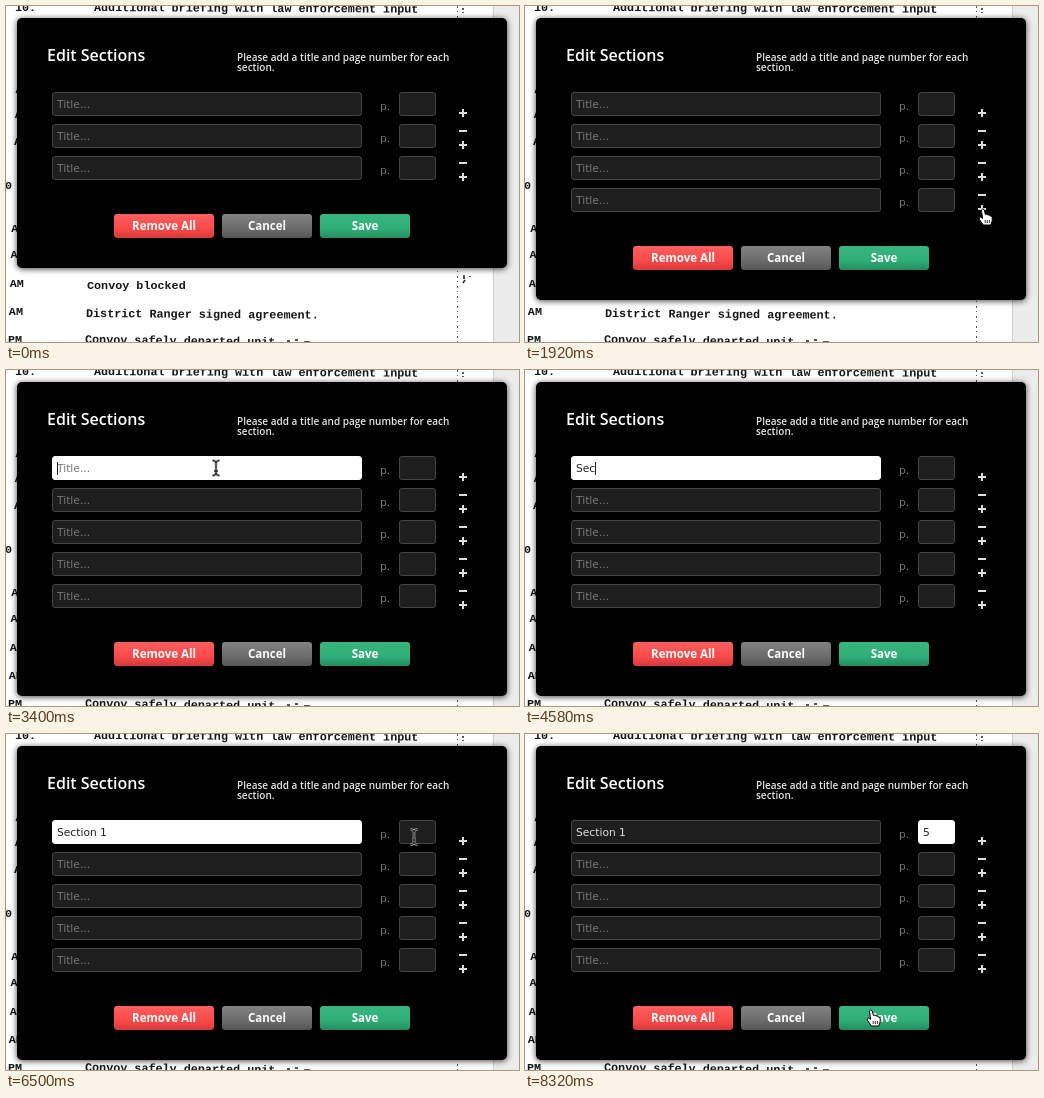
Write an HTML page that moves like this. It is 513x336 px and loops after 8340 ms.

```html
<!DOCTYPE html>
<html lang="en">
<head>
<meta charset="utf-8">
<title>Edit Sections</title>
<style>
  html, body { margin: 0; width: 100%; height: 100%; overflow: hidden; background: #fff; }
  svg { display: block; width: 513px; height: 336px; }
  text { white-space: pre; }
  .typed { font: bold 11.75px "Liberation Mono", monospace; fill: #161616; }
  .ui { font-family: "Open Sans", "Noto Sans", sans-serif; font-weight: 600; fill: #fff; }
  .head { font-size: 16px; }
  .hint { font-size: 10px; fill: #e6e6e6; }
  .btn text { font-size: 11.5px; font-weight: 700; text-anchor: middle; }
  .field text, .page { font: 10.7px "DejaVu Sans", sans-serif; fill: #777; }
  .field rect { fill: #1e1e1e; stroke: #444; }
  .field .filled { fill: #ddd; }
  .focus rect { fill: #fff; stroke: #fff; }
  .focus .filled { fill: #222; }
  .sign { stroke: #ddd; stroke-width: 2; }
  .panel { filter: drop-shadow(0 1px 3px rgba(0, 0, 0, .75)); }
  .outline { stroke-linejoin: round; }
</style>
</head>
<body>
<svg viewBox="0 0 513 336">
  <defs>
    <linearGradient id="red" x2="0" y2="1"><stop stop-color="#ff5f5f"/><stop offset=".6" stop-color="#fb4a4a"/><stop offset="1" stop-color="#d63a3a"/></linearGradient>
    <linearGradient id="grey" x2="0" y2="1"><stop stop-color="#828282"/><stop offset=".6" stop-color="#6c6c6c"/><stop offset="1" stop-color="#555"/></linearGradient>
    <linearGradient id="green" x2="0" y2="1"><stop stop-color="#38b67f"/><stop offset=".6" stop-color="#2fae78"/><stop offset="1" stop-color="#248c60"/></linearGradient>
  </defs>

  <g id="paper" class="typed">
    <rect x="487" width="26" height="336" fill="#ececec"/>
    <path d="M487.5 0V336" stroke="#ccc"/>
    <path d="M451.5 0V336" stroke="#555" stroke-dasharray="2 3 1 4"/>
    <path d="M457 2v2M457 6v1M458 269v4M459 274l-2 3M464 270v1M281 335h3M289 334h3M298 336h6" stroke="#222" stroke-width="1.5"/>
    <text x="9" y="5">10.</text>
    <text x="88" y="5" transform="rotate(.3 88 5)">Additional briefing with law enforcement input</text>
    <text x="-1" y="183">0</text>
    <text x="81" y="283">Convoy blocked</text>
    <text x="80" y="311" transform="rotate(.4 80 311)">District Ranger signed agreement.</text>
    <text x="79" y="337" transform="rotate(.8 79 337)">Convoy safely departed unit</text>
  </g>

  <rect id="panel" class="panel" x="11" y="12" width="490" rx="5"/>
  <text class="ui head" x="41" y="55">Edit Sections</text>
  <text class="ui hint" x="231" y="54.5">Please add a title and page number for each<tspan x="231" dy="10">section.</tspan></text>

  <g id="rows"></g>
  <g id="buttons" class="ui btn"></g>
  <path id="caret" stroke="#222"/>

  <g id="cursor">
    <path id="arrow" class="outline" d="M0 0V15L3.6 11.8L6 17L8.4 16L6.1 10.9H11Z" fill="#000" stroke="#fff"/>
    <g id="beam" fill="none">
      <path d="M-3.5-7.5Q0-7.5 0-5Q0-7.5 3.5-7.5M0-5V5M-3.5 7.5Q0 7.5 0 5Q0 7.5 3.5 7.5M-2 3H2" stroke="#aaa" stroke-width="2.6"/>
      <path d="M-3.5-7.5Q0-7.5 0-5Q0-7.5 3.5-7.5M0-5V5M-3.5 7.5Q0 7.5 0 5Q0 7.5 3.5 7.5M-2 3H2" stroke="#111"/>
    </g>
    <g id="hand" class="outline">
      <path d="M-1.5 1Q0-1 1.5 1L2.5 5.5Q4 4.5 5 6Q6.6 5.2 7.3 7Q9 6.4 9.3 8.5V12L8 16H0L-4-.0Z" fill="none"/>
      <path d="M-1.6 1Q-.3-1 1.2 .8L2.4 5.4Q4 4.6 5 6Q6.6 5.3 7.2 7Q9 6.6 9.2 8.6V11.6L7.8 16H.4L-3.6 10.4Q-4.4 8.2-2.4 8L-.4 9.4Z" fill="#fff" stroke="#000"/>
      <path d="M2.2 11V14M4.3 11V14M6.4 11V14" stroke="#000" stroke-width=".8"/>
    </g>
  </g>
</svg>

<script>
const LOOP = 8340, ROW = 32, TOP = 86;
const $ = id => document.getElementById(id);

function add(parent, tag, attrs, text = '') {
  const el = document.createElementNS('http://www.w3.org/2000/svg', tag);
  for (const k in attrs) el.setAttribute(k, attrs[k]);
  el.textContent = text;
  parent.append(el);
  return el;
}

function addField(parent, x, y, w, text) {
  const g = add(parent, 'g', { class: 'field' });
  add(g, 'rect', { x: x + .5, y: y + .5, width: w - 1, height: 23, rx: 2.5 });
  return { g, x, y, label: add(g, 'text', { x: x + 5, y: y + 16 }, text) };
}

function addRow(i) {
  const y = TOP + i * ROW, g = add($('rows'), 'g', {});
  const title = addField(g, 46, y, 310, 'Title...');
  add(g, 'text', { class: 'page', x: 374, y: y + 18 }, 'p.');
  const page = addField(g, 393, y, 37, '');
  add(g, 'path', { class: 'sign', d: `M453 ${y + 21}h8m-4-4v8` + (i ? `M453 ${y + 7}h8` : '') });
  return { g, title, page };
}

function addButton(x, w, fill, text) {
  add($('buttons'), 'rect', { x, y: 0, width: w, height: 24, rx: 3, fill: `url(#${fill})` });
  add($('buttons'), 'text', { x: x + w / 2, y: 16 }, text);
}

for (const y of [87, 112, 139, 226, 252, 281, 309, 337])
  add($('paper'), 'text', { x: 2 + (337 - y) * .03, y }, y > 330 ? 'PM' : 'AM');

const rows = [0, 1, 2, 3, 4].map(addRow);
addButton(108, 100, 'red', 'Remove All');
addButton(216, 90, 'grey', 'Cancel');
addButton(314, 90, 'green', 'Save');

const ease = {
  hold: () => 0,
  lin: p => p,
  out: p => 1 - (1 - p) ** 2,
  both: p => p * p * (3 - 2 * p)
};

// time, x, y, easing towards the point
const path = [
  [60, 517, 205, 'hold'], [640, 458, 171, 'out'],
  [1220, 458, 171, 'hold'], [1920, 458, 203, 'both'],
  [2460, 458, 203, 'hold'], [2740, 232, 124, 'both'], [3060, 210, 98, 'out'],
  [5660, 210, 98, 'hold'], [6420, 408, 103, 'both'],
  [6500, 408, 103, 'hold'], [6560, 409, 101, 'lin'],
  [7300, 409, 101, 'hold'], [7840, 384, 223, 'both'],
  [8100, 362, 257, 'lin'], [8310, 346, 276, 'out'], [LOOP, 346, 276, 'hold']
];

// time at which each piece of the title is typed
const keys = [[3680, 'S'], [4300, 'e'], [4540, 'c'], [4780, 't'], [4900, 'i'], [5060, 'o'], [5220, 'n'], [5500, ' 1']];

function pointAt(t) {
  const i = Math.max(1, path.findIndex(p => p[0] > t));
  const [t0, x0, y0] = path[i - 1], [t1, x1, y1, kind] = path[i];
  const p = ease[kind]((t - t0) / (t1 - t0));
  return [x0 + (x1 - x0) * p, y0 + (y1 - y0) * p];
}

function cursorOver(x, y, count) {
  const within = (a, b) => x >= a && x <= b;
  const bottom = TOP + count * ROW, dy = (y - TOP) % ROW;
  if (y >= TOP && y < bottom) {
    if (within(451, 464)) return 'hand';
    if (dy <= 24 && (within(46, 356) || within(393, 430))) return 'beam';
  }
  const onButton = y >= bottom + 26 && y <= bottom + 50;
  return onButton && (within(108, 208) || within(216, 306) || within(314, 404)) ? 'hand' : 'arrow';
}

function setText(field, text, placeholder) {
  field.label.textContent = text || placeholder;
  field.label.classList.toggle('filled', !!text);
}

function draw(t) {
  const count = t < 1180 ? 3 : t < 2300 ? 4 : 5;
  rows.forEach((r, i) => r.g.style.display = i < count ? '' : 'none');
  $('panel').setAttribute('height', 154 + count * ROW);
  $('buttons').setAttribute('transform', `translate(0 ${TOP + count * ROW + 26})`);

  const { title, page } = rows[0];
  const typed = keys.filter(k => k[0] <= t).map(k => k[1]).join('');
  const number = t >= 7280 ? '5' : '';
  const active = t < 3400 ? null : t < 6700 ? title : page;
  setText(title, typed, 'Title...');
  setText(page, number, '');
  for (const f of [title, page]) f.g.classList.toggle('focus', f === active);

  const blinkOff = t >= 6000 && t < 6700 || t >= 7860;
  $('caret').style.display = active && !blinkOff ? '' : 'none';
  if (active) {
    const filled = active === title ? typed : number;
    const x = active.x + 5.5 + (filled ? Math.round(active.label.getComputedTextLength()) : 0);
    $('caret').setAttribute('d', `M${x} ${active.y + 6}v13`);
  }

  const [x, y] = pointAt(t), kind = cursorOver(x, y, count);
  const hidden = t < 60 || t >= 3680 && t < 5660 || t >= 7280 && t < 7320;
  $('cursor').style.display = hidden ? 'none' : '';
  $('cursor').setAttribute('transform', `translate(${Math.round(x)} ${Math.round(y)})`);
  for (const id of ['arrow', 'beam', 'hand']) $(id).style.display = id === kind ? '' : 'none';
}

const start = performance.now();
function tick() {
  draw((performance.now() - start) % LOOP);
  requestAnimationFrame(tick);
}
tick();
</script>
</body>
</html>
```
